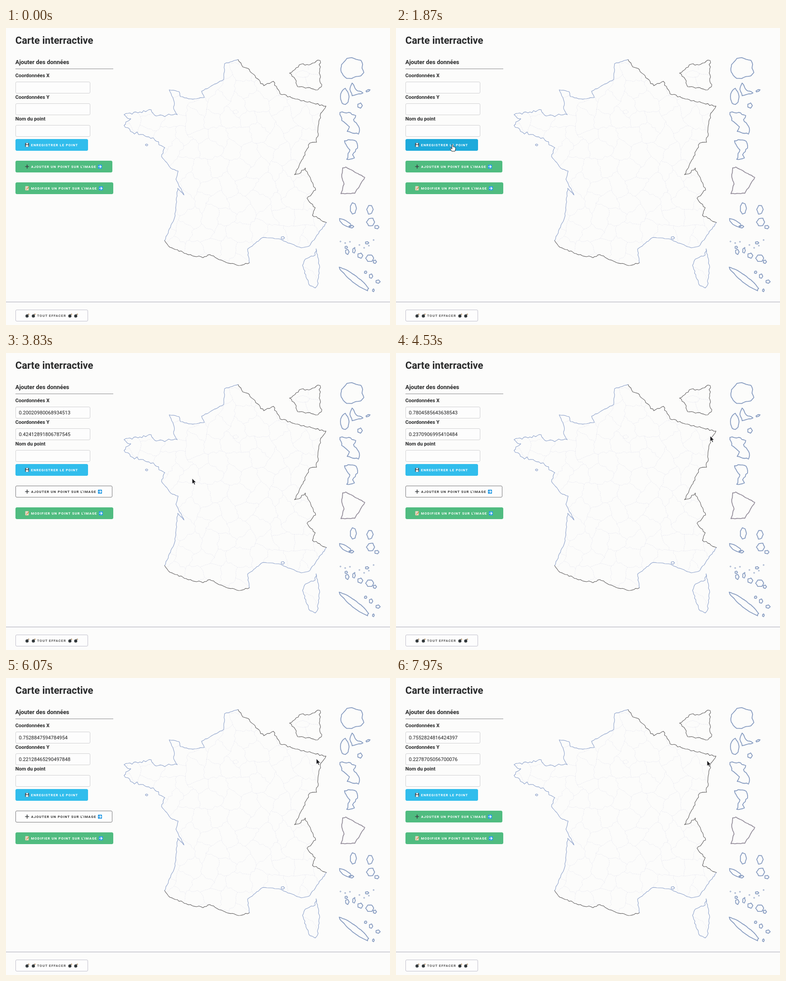
Write an HTML page that moves like this. It is 852 px wide and 658 px high and loops after 8 s.

```html
<!DOCTYPE html>
<html lang="fr">
<head>
<meta charset="utf-8">
<title>Carte interractive</title>
<style>
html, body { margin: 0; width: 100%; height: 100%; overflow: hidden; background: #fcfcfb; }
svg { display: block; width: 852px; height: 658px; font-family: Roboto, sans-serif; }
text { fill: #292a2b; white-space: pre; }
.b { font-weight: 700; }
.btn { font-weight: 700; font-size: 7.59px; letter-spacing: 1.035px; }
.val { font-size: 11.04px; fill: #1c1c1c; }
path { fill: none; stroke-linejoin: round; stroke-linecap: round; }
.coast { stroke: #8ca1cb; stroke-width: 1.1; }
.border { stroke: #5f5d5d; stroke-width: 1.1; }
.isle { stroke: #869bc0; stroke-width: 1.8; }
.guiana { stroke: #958e9b; stroke-width: 1.8; }
.dept { stroke: #e7e7f0; stroke-width: .8; stroke-dasharray: 2.5 1.8; }
</style>
</head>
<body>
<svg id="stage" viewBox="0 0 852 658" xmlns="http://www.w3.org/2000/svg"></svg>
<script>
const NS = 'http://www.w3.org/2000/svg';
const stage = document.getElementById('stage');

function add(tag, attrs, parent = stage) {
  const el = document.createElementNS(NS, tag);
  for (const k in attrs) el.setAttribute(k, attrs[k]);
  parent.appendChild(el);
  return el;
}
function label(x, y, str, cls, size, parent) {
  const el = add('text', { x, y, class: cls }, parent);
  if (size) el.setAttribute('font-size', size);
  el.textContent = str;
  return el;
}
const box = (x, y, w, h, fill, stroke = 'none', rx = 2.5, parent) =>
  add('rect', { x, y, width: w, height: h, rx, fill, stroke }, parent);
const line = (d, stroke, width, parent) => add('path', { d, stroke, 'stroke-width': width }, parent);

// Repeatable noise in -0.5 .. 0.5
const hash = (x, y) => {
  const v = Math.sin(x * 12.9898 + y * 78.233) * 43758.5453;
  return v - Math.floor(v) - .5;
};

/* ---- map ---- */
const points = s => s.trim().split(/\s+/).map(p => p.split(',').map(Number));

// Polyline with small seeded notches along every segment
function rough(pts, amp, step = 4.5) {
  let d = 'M' + pts[0];
  for (let i = 1; i < pts.length; i++) {
    const [ax, ay] = pts[i - 1], [bx, by] = pts[i];
    const len = Math.hypot(bx - ax, by - ay) || 1, n = Math.max(1, Math.round(len / step));
    for (let k = 1; k <= n; k++) {
      const u = k / n, x = ax + (bx - ax) * u, y = ay + (by - ay) * u;
      const o = k < n ? hash(Math.round(x), Math.round(y)) * 2 * amp / len : 0;
      d += `L${(x - (by - ay) * o).toFixed(1)} ${(y + (bx - ax) * o).toFixed(1)}`;
    }
  }
  return d;
}
const trace = (pts, cls, amp) => add('path', { d: rough(pts, amp), class: cls });
const outline = (s, cls, amp) => { const p = points(s); trace([...p, p[0]], cls, amp); };

const mainland = [
  ['coast', 1, '515,70 485,79 483,114 434,140 440,154 410,157 387,152 384,141 362,137 373,163 372,179 380,192'],
  ['coast', 3, '380,192 333,195 322,181 297,186 262,192 277,201 262,216 281,231 304,236 330,248 352,265'],
  ['coast', 1, '352,265 345,285 365,310 382,317 377,335 395,370 381,355 374,420 352,471'],
  ['border', 1.5, '352,471 364,486 400,500 437,509 452,502 490,520 520,526 540,520'],
  ['coast', 1, '540,520 536,490 570,464 605,467 655,487 673,483 688,462 711,431'],
  ['border', 1.8, '711,431 680,415 686,398 668,377 687,359 670,324 664,310 650,323 640,325 660,285 674,255 689,253'],
  ['border', 1.8, '689,253 697,194 710,173 664,163 608,146 593,118 572,128 554,110 540,92 525,86 515,70']
].map(([cls, amp, s]) => ({ cls, amp, pts: points(s) }));

const clip = add('clipPath', { id: 'land' }, add('defs', {}));
add('path', { d: 'M' + mainland.flatMap(m => m.pts).join('L') + 'Z' }, clip);

// Departments: jittered honeycomb clipped to the mainland
function departments() {
  const s = 24, w = s * Math.sqrt(3), g = add('g', { 'clip-path': 'url(#land)' });
  const jitter = (x, y) => {
    const a = Math.round(x), b = Math.round(y);
    return [a + hash(a, b) * 20, b + hash(b, a) * 20];
  };
  let d = '';
  for (let r = 0; r < 14; r++) for (let c = 0; c < 13; c++) {
    const cx = 245 + (c + r % 2 / 2) * w, cy = 60 + r * 1.5 * s, v = [];
    for (let k = 0; k < 4; k++) {
      const a = (k - .5) * Math.PI / 3;
      v.push(jitter(cx + s * Math.cos(a), cy + s * Math.sin(a)));
    }
    d += rough(v, 3, 6);
  }
  add('path', { d, class: 'dept' }, g);
}

// Closed island: a tilted ellipse with seeded dents
function blob(cls, cx, cy, rx, ry, tilt = 0) {
  const n = Math.max(5, Math.round((rx + ry) / 3)), c = Math.cos(tilt), s = Math.sin(tilt), p = [];
  for (let i = 0; i < n; i++) {
    const a = i / n * 2 * Math.PI, k = 1 + hash(cx + i, cy) * .25;
    const x = rx * k * Math.cos(a), y = ry * k * Math.sin(a);
    p.push([cx + x * c - y * s, cy + x * s + y * c]);
  }
  trace([...p, p[0]], cls, .5);
}

departments();
blob('dept', 509, 186, 7, 5);
mainland.forEach(m => trace(m.pts, m.cls, m.amp));
blob('coast', 312, 259, 3, 2);
blob('coast', 614, 465, 4, 3);

// Corsica and the Paris inset
outline('688,489 696,530 691,570 686,576 672,568 658,526 664,512 686,503', 'coast', 1.5);
trace(points('663,531 682,540 691,560'), 'dept', 2);
outline('629,100 655,80 672,82 692,71 697,72 695,100 700,130 692,137 669,132 647,130 644,117', 'border', 1.8);
blob('dept', 658, 102, 15, 8);
['671,92 672,82', '673,100 696,106', '664,108 672,131'].forEach(s => trace(points(s), 'dept', 1.5));

// Overseas: Réunion, Guadeloupe, Martinique, Mayotte, Guyane
blob('isle', 767, 89, 26, 22);
blob('isle', 751, 152, 10, 18);
outline('768,122 777,137 792,144 768,150 763,136', 'isle', 1);
outline('741,187 760,187 776,194 771,203 784,222 782,235 757,229 762,219 745,205', 'isle', 1.5);
outline('751,250 764,248 777,251 780,266 769,281 773,288 756,291 763,270', 'isle', 1.5);
outline('747,310 754,308 796,331 774,366 743,367 750,346 745,330', 'guiana', .8);

// Archipelagos
[
  [803, 139, 5, 2, -.4], [785, 172, 6, 6], [770, 400, 7, 13], [753, 432, 16, 5, .5], [766, 440, 6, 3],
  [808, 402, 7, 11], [809, 430, 9, 9], [823, 441, 5, 4], [755, 486, 3, 3], [757, 496, 4, 6], [772, 493, 3, 6],
  [786, 504, 6, 6], [801, 476, 4, 3], [807, 510, 9, 8], [818, 518, 4, 4], [773, 556, 40, 7, .66],
  [798, 541, 3, 3], [810, 550, 4, 5], [825, 562, 5, 4], [815, 581, 2, 3]
].forEach(b => blob('isle', ...b));
for (let i = 0; i < 8; i++) {
  const x = 742 + i * 10.5, y = 478 + hash(i, 3) * 22;
  box(x - 1, y - 1, 2.2, 2.2, 'none', '#869bc0', .5);
}

/* ---- form ---- */
const left = 20.7;
label(left, 35, 'Carte interractive', 'b', 22.08);
label(left, 79.5, 'Ajouter des données', 'b', 12.92);
box(21, 90, 217, 1, '#8b8b8d', 'none', 0);
const fields = ['Coordonnées X', 'Coordonnées Y', 'Nom du point'].map((name, i) => {
  const y = 48 * i;
  label(left, 109 + y, name, 'b', 11.04);
  box(21.5, 119.5 + y, 165, 25, '#fdfdfd', '#d0d0d2');
  return label(28.4, 136 + y, '', 'val');
});
box(0, 606.5, 852, 1, '#a2a4b1', 'none', 0);

const icons = {
  disk(g, x, y) {
    box(x, y, 8.6, 8.6, '#3d4650', 'none', 1, g);
    box(x + 2, y, 4.6, 3.2, '#dfe5e8', 'none', 0, g);
    box(x + 1.5, y + 4.6, 5.6, 4, '#f3f3ee', 'none', 0, g);
  },
  plus(g, x, y) {
    line(`M${x + .6} ${y + 4.3}h7.4m-3.7 -3.7v7.4`, '#3c4043', 1.7, g);
  },
  note(g, x, y) {
    box(x + .5, y, 7, 8.8, '#f1ece0', '#c9b98f', .6, g);
    line(`M${x + 2} ${y + 2.5}h4m-4 2h3`, '#9aa0a4', .7, g);
    line(`M${x + 3} ${y + 7}l5 -5.5`, '#d98a3a', 1.4, g);
  },
  arrow(g, x, y) {
    box(x, y, 9, 9, '#2c9ee6', 'none', 1, g);
    line(`M${x + 1.6} ${y + 4.5}h5.6m-2.5 -2.5l2.6 2.5l-2.6 2.5`, '#fff', 1.3, g);
  },
  bomb(g, x, y) {
    add('circle', { cx: x + 3.7, cy: y + 5.2, r: 3.5, fill: '#343a3d' }, g);
    line(`M${x + 5.2} ${y + 2.4}l1.3 -1.4l1.4 .5`, '#5b5650', 1.2, g);
    add('circle', { cx: x + 8, cy: y + 1.5, r: .9, fill: '#dd9b48' }, g);
  }
};
function button(y, w, str, tx, marks) {
  const g = add('g', {});
  const rect = box(21.5, y + .5, w - 1, 25, 'none', 'none', 2.5, g);
  const text = label(tx, y + 16, str, 'btn', 0, g);
  marks.forEach(([kind, x]) => icons[kind](g, x, y + 8.7));
  return {
    paint(fill, edge = fill, ink = '#fff') {
      rect.setAttribute('fill', fill);
      rect.setAttribute('stroke', edge);
      text.style.fill = ink;
    },
    has: (px, py) => px >= 21 && px <= 21 + w && py >= y && py <= y + 26
  };
}
const save = button(246, 161, 'ENREGISTRER LE POINT', 55.6, [['disk', 42.5]]);
const create = button(294, 215, 'AJOUTER UN POINT SUR L\'IMAGE', 55.8, [['plus', 42.5], ['arrow', 204]]);
const edit = button(342, 217, 'MODIFIER UN POINT SUR L\'IMAGE', 55.6, [['note', 42.5], ['arrow', 206]]);
const wipe = button(624, 161, 'TOUT EFFACER', 69, [43, 57, 138, 151].map(x => ['bomb', x]));
wipe.paint('#fdfdfd', '#c0bfcc', '#555');

/* ---- pointer ---- */
const arrow = add('path', {
  d: 'M0 0V12L2.8 9.6L4.9 14L6.9 13L4.9 8.8H8.7Z',
  style: 'fill:#1b1b1f;stroke:#fff;stroke-width:.8'
});
const hand = add('path', {
  d: 'M-1.2 1Q0 -.8 1.2 1V5.2Q2.6 4.4 3.2 5.6Q4.6 5 5.2 6.2Q7 5.8 7 7.6V10.5L5.8 15H-1.6L-4.8 9.6Q-4.8 7.8 -2.8 8.6L-1.2 10Z',
  style: 'fill:#fff;stroke:#1b1b1f;stroke-width:1'
});

// Pointer path: step, then position as a share of the map image
const rest = [.7552824816424397, .2278705056700076];
const keys = [
  [6, .435, 1.01], [20, .309, .507], [48, -.18, .36], [56, -.196, .3515], [82, -.154, .434], [100, -.15, .436],
  [113, .20020980068934513, .42412891806787545], [115, .2887, .3845],
  [134, .7804585643638543, .2370906995410484], [136, .7668, .2294], [158, .76, .226],
  [180, .7528847594784954, .22128465290497848], [226, ...rest], [236, ...rest], [240, ...rest]
];
const slope = (i, c) => {
  const a = keys[Math.max(0, i - 1)], b = keys[Math.min(keys.length - 1, i + 1)];
  return (b[c] - a[c]) / (b[0] - a[0]);
};
function track(n) {
  let i = 0;
  while (i < keys.length - 2 && keys[i + 1][0] <= n) i++;
  const a = keys[i], b = keys[i + 1], w = b[0] - a[0], u = Math.max(0, (n - a[0]) / w), v = 1 - u;
  return [1, 2].map(c => a[c] + (b[c] - a[c]) * u * u * (3 - 2 * u)
    + w * u * v * (slope(i, c) * v - slope(i + 1, c) * u));
}

function draw(ms) {
  const n = Math.min(239, Math.floor((ms + 4) * .03));
  const [fx, fy] = track(n), x = 241.5 + 594 * fx, y = 45 + 606 * fy;
  const seen = n >= 6, over = b => seen && b.has(x, y), picking = n >= 101 && n < 234;

  save.paint(over(save) ? '#1eaadb' : '#31bdec');
  if (picking) create.paint('#fdfdfd', '#77777a', '#333');
  else create.paint(over(create) ? '#43a670' : '#50bc80');
  edit.paint(over(edit) ? '#43a670' : '#50bc80');

  // The fields trail the pointer by two steps
  const late = track(n - 2);
  fields.slice(0, 2).forEach((f, i) => { f.textContent = n >= 111 ? late[i] : ''; });

  const onButton = [save, create, edit].some(over), at = `translate(${x.toFixed(1)} ${y.toFixed(1)})`;
  arrow.setAttribute('transform', at);
  hand.setAttribute('transform', at);
  arrow.style.display = seen && !onButton ? '' : 'none';
  hand.style.display = seen && onButton ? '' : 'none';
}

const start = performance.now();
(function tick() {
  draw((performance.now() - start) % 8000);
  requestAnimationFrame(tick);
})();
</script>
</body>
</html>
```
